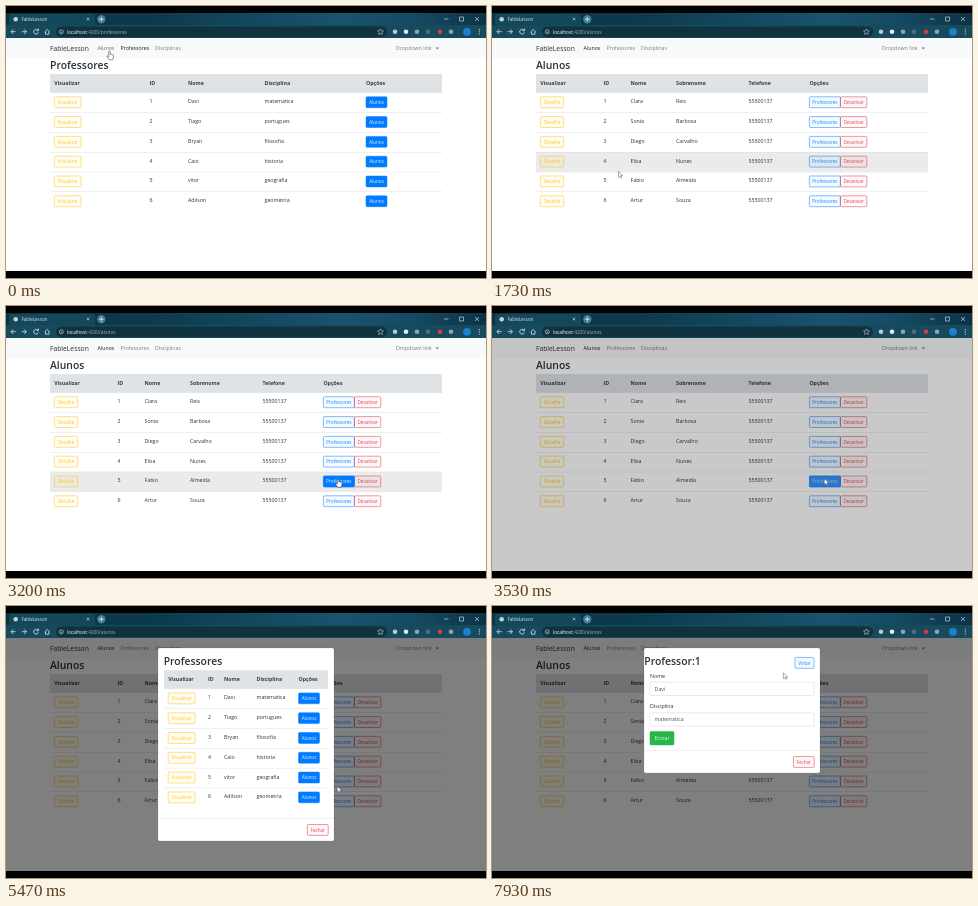
An HTML page that plays this animation: 480x272 px, repeating every 8000 ms.

```html
<!DOCTYPE html>
<html lang="pt">
<head>
<meta charset="utf-8">
<title>FableLesson</title>
<style>
  html, body { margin: 0; width: 100%; height: 100%; overflow: hidden; background: #000; }
  svg { display: block; width: 480px; height: 272px; font-family: "Open Sans", "Noto Sans", sans-serif; }
  text { white-space: pre; }
</style>
</head>
<body>
<svg id="stage" viewBox="0 0 480 272" xmlns="http://www.w3.org/2000/svg"></svg>
<script>
const LOOP = 8000, FRAME = 1000 / 15;
const PAGE_TOP = 32, PAGE_HEIGHT = 233;
const ROW = 19.8, HEAD = 18.5;
const BODY = 5.25, SMALL = 4.6, TITLE = 10.4;
const INK = '#2c3135', BLUE = '#007bff', RED = '#dc3545', YELLOW = '#ffc107', GREEN = '#28b54a';

const rect = (x, y, w, h, fill, extra = '') =>
  `<rect x="${x}" y="${y}" width="${w}" height="${h}" fill="${fill}" ${extra}/>`;
const circle = (x, y, r, fill, extra = '') => `<circle cx="${x}" cy="${y}" r="${r}" fill="${fill}" ${extra}/>`;
const text = (x, y, s, size = BODY, fill = INK, extra = '') =>
  `<text x="${x}" y="${y}" font-size="${size}" fill="${fill}" ${extra}>${s}</text>`;
const line = (d, stroke, width = 0.8) => `<path d="${d}" fill="none" stroke="${stroke}" stroke-width="${width}"/>`;
const group = (id, inner) => `<g id="${id}">${inner}</g>`;

function button(x, y, w, label, color, solid = false, ink = '#fff', h = 10.9, size = SMALL) {
  const box = `stroke="${color}" stroke-width=".5" rx="1.1" fill-opacity="${solid ? 1 : 0.04}"`;
  return rect(x, y, w, h, color, box) +
    text(x + w / 2, y + h / 2 + size * 0.36, label, size, solid ? ink : color, 'text-anchor="middle" opacity=".9"');
}

// Table whose header starts at y; each row ends with its own buttons.
function table(id, x, y, w, columns, rows, buttons) {
  const top = y + HEAD;
  let out = rect(x, y, w, HEAD, '#dfe3e5') +
    rect(x, top, w, ROW, '#000', `id="${id}Hover" fill-opacity=".08" visibility="hidden"`);
  columns.forEach(([cx, name]) => out += text(cx, y + 11, name, BODY, '#383d42', 'font-weight="700"'));
  rows.forEach((row, i) => {
    const ry = top + i * ROW;
    out += rect(x, ry, w, 0.4, '#d5d9dd');
    row.forEach((cell, j) => out += text(columns[j + 1][0], ry + 10.6, cell));
    out += buttons(ry + 4.2);
  });
  return out;
}

const teachers = [
  ['Davi', 'matematica'], ['Tiago', 'portugues'], ['Bryan', 'filosofia'],
  ['Caio', 'historia'], ['vitor', 'geografia'], ['Adilson', 'geometria']
].map((r, i) => [i + 1, ...r]);

const students = [
  ['Clara', 'Reis'], ['Sonia', 'Barbosa'], ['Diego', 'Carvalho'],
  ['Elisa', 'Nunes'], ['Fabio', 'Almeida'], ['Artur', 'Souza']
].map((r, i) => [i + 1, ...r, '55500137']);

function teacherTable(id, x, y, w, xs) {
  const names = ['Visualizar', 'ID', 'Nome', 'Disciplina', 'Opções'];
  return table(id, x, y, w, names.map((n, i) => [xs[i], n]), teachers, by =>
    button(xs[0], by, 26.8, 'Visualizar', YELLOW) + button(xs[4], by, 21, 'Alunos', BLUE, true));
}

function studentTable() {
  const columns = [[48.3, 'Visualizar'], [111.5, 'ID'], [138.5, 'Nome'],
    [184, 'Sobrenome'], [256.5, 'Telefone'], [317.4, 'Opções']];
  return table('students', 44, 68.1, 392, columns, students, by =>
    button(48.3, by, 23.4, 'Detalhe', YELLOW) +
    button(317.4, by, 31, 'Professores', BLUE) + button(348.4, by, 26.4, 'Desativar', RED));
}

const title = (x, y, s) => text(x, y, s, TITLE, INK, 'font-weight="600"');

function browser() {
  const pale = '#dce8ec';
  let out = rect(0, 7, 480, 12.5, 'url(#sky)');
  for (let i = 0; i < 50; i++) {
    out += circle(100 + (i * 97.3) % 330, 8 + (i * 5.7) % 10, 0.3, '#6fa3b8', 'opacity=".4"');
  }
  out += rect(3, 8, 86, 12, '#12485a', 'rx="2"') + rect(0, 19, 480, 13.5, '#174a5d') +
    rect(50, 20.4, 331, 10.6, '#10323f', 'rx="5.3"') +
    circle(9.7, 13.2, 2.3, '#c9d0d3') + text(15.5, 15, 'FableLesson', 4.5, pale) +
    line('M80.7 11.7l2.6 2.6m0-2.6l-2.6 2.6', pale, 0.6) +
    circle(95.3, 13.2, 4.2, '#3f7f98') + line('M92.9 13.2h4.8m-2.4-2.4v4.8', '#fff', 0.7) +
    line('M438 13h4.5M453.5 11h4v4h-4zM469 11l4 4m0-4l-4 4', pale, 0.6) +
    line('M9.7 25.7H5m2.2-2.3L5 25.7l2.2 2.3M15.7 25.7h4.7m-2.2-2.3l2.2 2.3-2.2 2.3', pale) +
    line('M32 24.2a2.4 2.4 0 1 0 .4 2.2M32.5 22.7v2h-2', pale) +
    line('M38.6 26l2.6-2.5 2.6 2.5M39.5 25.7v2.5h3.4v-2.5', pale) +
    circle(55.3, 25.8, 2, 'none', `stroke="${pale}" stroke-width=".6"`) + line('M55.3 25.4v1.6', pale, 0.6) +
    `<text x="61" y="27.7" font-size="4.75" fill="#9db4bd"><tspan fill="#fff">localhost</tspan>:4200/<tspan id="path"></tspan></text>` +
    `<path d="M374.5 22.8l.9 2 2.1.2-1.6 1.4.5 2.1-1.9-1.1-1.9 1.1.5-2.1-1.6-1.4 2.1-.2z" fill="none" stroke="${pale}" stroke-width=".5"/>`;
  [[389, '#b9c9cf'], [400, '#e4ecef'], [411, '#8fa6af'], [422, '#4d6f7c'], [434, '#d63a45'], [445, '#8fa6af']]
    .forEach(([x, c]) => out += circle(x, 25.8, 2.3, c));
  out += circle(461, 25.8, 3.9, '#1c7fd0');
  [23.6, 25.8, 28].forEach(y => out += circle(473.3, y, 0.6, pale));
  return out;
}

const navbar = () => rect(0, PAGE_TOP, 480, 20.5, '#f8f9fa') +
  text(44, 45, 'FableLesson', 6.75, '#2c3135') +
  text(91.6, 44.4, 'Alunos', BODY, '#000', 'id="navStudents"') +
  text(114.5, 44.4, 'Professores', BODY, '#000', 'id="navTeachers"') +
  text(149, 44.4, 'Disciplinas', BODY, '#000', 'opacity=".5"') +
  text(390, 44.4, 'Dropdown link', BODY, '#000', 'opacity=".5"') +
  '<path d="M429.5 41.6h3.6l-1.8 1.9z" opacity=".5"/>';

const panel = bottom => rect(152, 42, 176, bottom - 42, '#fff', 'rx="1.7" stroke="#000" stroke-opacity=".2" stroke-width=".4"') +
  rect(152, bottom - 22.4, 176, 0.4, '#d5d9dd') + button(301.4, bottom - 16.5, 20.8, 'Fechar', RED);

const field = (y, label, value) => text(158, y - 4.6, label) +
  rect(158, y, 164, 13.3, '#fff', 'rx="1.4" stroke="#ced4da" stroke-width=".5"') +
  text(162.6, y + 8.5, value, BODY, '#495057');

const form = () => panel(167) + title(152.3, 59.3, 'Professor:1') +
  button(303, 51.4, 19, 'Voltar', BLUE) +
  field(76.2, 'Nome', 'Davi') + field(106.8, 'Disciplina', 'matematica') +
  button(158, 125.6, 24, 'Enviar', GREEN, true, '#fff', 13.3, BODY);

const pointer = () =>
  group('arrow', '<path d="M.3.3v5.8l1.4-1.2.9 2 1-.4-.9-2h1.9z" fill="#fff" stroke="#444" stroke-width=".45"/>') +
  group('hand', '<path d="M-.7.5q.7-.9 1.4 0v2.7l2.6.6q.9.3.8 1.3l-.5 2.3-.5 1.4h-3.3l-2.2-3.1q-.3-1 .6-.9l1.1.8z" fill="#fff" stroke="#222" stroke-width=".5"/>');

const stage = document.getElementById('stage');
stage.innerHTML =
  `<defs><linearGradient id="sky"><stop offset="0" stop-color="#0b3342"/><stop offset=".3" stop-color="#0c3a4d"/>
   <stop offset=".7" stop-color="#19536e"/><stop offset=".85" stop-color="#154a63"/><stop offset="1" stop-color="#0c3345"/></linearGradient></defs>` +
  rect(0, 0, 480, 272, '#000') + browser() + rect(0, PAGE_TOP, 480, PAGE_HEIGHT, '#fff') + navbar() +
  group('teacherPage', title(44, 63.2, 'Professores') +
    teacherTable('teachers', 44, 68.1, 392, [48.3, 143.5, 182, 258.5, 360])) +
  group('studentPage', title(44, 63.2, 'Alunos') + studentTable() +
    group('openFill', button(317.4, 170, 31, 'Professores', BLUE, true))) +
  rect(0, PAGE_TOP, 480, PAGE_HEIGHT, '#000', 'id="backdrop"') +
  group('modal',
    group('list', panel(235) + title(157.7, 59.3, 'Professores') +
      teacherTable('picker', 158, 64.2, 164, [162.2, 202, 218, 250.5, 292.5]) +
      group('viewFill', button(162.2, 86.9, 26.8, 'Visualizar', YELLOW, true, INK))) +
    group('form', form())) +
  group('cursor', pointer());

const el = {};
stage.querySelectorAll('[id]').forEach(node => el[node.id] = node);

const set = (id, name, value) => el[id].setAttribute(name, value);
const show = (id, on) => set(id, 'visibility', on ? 'inherit' : 'hidden');
const ramp = (t, start, length) => Math.min(1, Math.max(0, (t - start) / length));
const smooth = p => p * p * (3 - 2 * p);

// Cursor tip: time, x, y, and whether the move leading there is eased.
const path = [
  [0, 103.5, 45], [790, 103.5, 45], [1467, 93.5, 131], [1600, 95, 141], [2070, 205, 226],
  [2470, 320.5, 209], [2933, 332, 172.5, 1], [4870, 332, 172.5], [5000, 331.5, 176.5],
  [5140, 331.5, 176.5], [5333, 331, 180], [5467, 331, 180], [6267, 174, 92, 1],
  [6467, 176, 91], [7535, 176, 91], [7933, 291, 66.5, 1]
];

function cursorAt(t) {
  const i = path.findIndex(key => key[0] > t);
  if (i < 0) return path[path.length - 1].slice(1, 3);
  if (i === 0) return path[0].slice(1, 3);
  const [t0, x0, y0] = path[i - 1], [t1, x1, y1, eased] = path[i];
  let p = (t - t0) / (t1 - t0);
  if (eased) p = smooth(p);
  return [x0 + (x1 - x0) * p, y0 + (y1 - y0) * p];
}

function hover(id, left, right, top, [x, y], enabled) {
  const row = Math.floor((y - top) / ROW);
  show(id, enabled && x > left && x < right && row >= 0 && row < 6);
  set(id, 'y', top + row * ROW);
}

function draw(ms) {
  const t = Math.floor((ms + 5) / FRAME) * FRAME;
  const onStudents = t > 60, opening = t > 3460, details = t > 6790;

  show('teacherPage', !onStudents);
  show('studentPage', onStudents);
  el.path.textContent = onStudents ? 'alunos' : 'professores';
  set('navStudents', 'opacity', onStudents ? 0.9 : 0.6);
  set('navTeachers', 'opacity', onStudents ? 0.5 : 0.9);

  // Row highlights trail the cursor by one frame.
  const lagged = cursorAt(t - FRAME);
  hover('studentsHover', 44, 436, 86.6, lagged, onStudents && !opening);
  hover('pickerHover', 158, 322, 82.7, lagged, opening && !details);
  set('openFill', 'opacity', ramp(t, 2800, 150) - ramp(t, 3500, 150));
  set('viewFill', 'opacity', ramp(t, 6270, 150));

  set('backdrop', 'opacity', 0.5 * ramp(t, 3470, 150));
  const drop = 1 - ramp(t, 3530, 300);
  set('modal', 'transform', `translate(0 ${-17.6 * drop * drop})`);
  set('modal', 'opacity', ramp(t, 3540, 200));
  show('list', !details);
  show('form', details);

  const [x, y] = cursorAt(t);
  const hand = t < 830 || (t > 2790 && !opening) || (t > 6200 && !details);
  show('hand', hand);
  show('arrow', !hand);
  set('cursor', 'transform', `translate(${x} ${y})`);
}

const begin = performance.now();
function tick() {
  draw((performance.now() - begin) % LOOP);
  requestAnimationFrame(tick);
}
tick();
</script>
</body>
</html>
```
